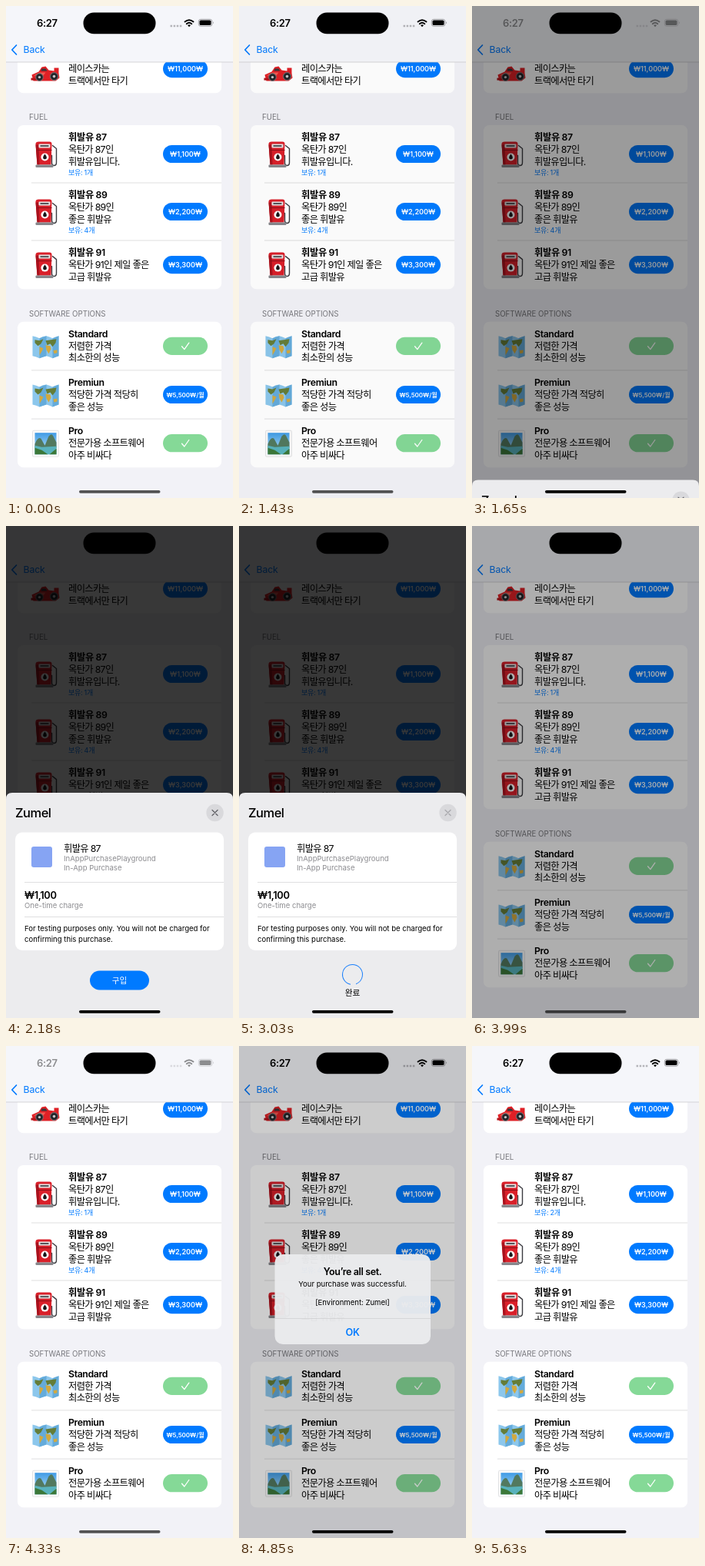
Write an HTML page that moves like this. It is 295 px wide and 640 px high and loops after 6160 ms.

```html
<!DOCTYPE html>
<html lang="ko">
<head>
<meta charset="utf-8">
<title>In-app purchase</title>
<style>
  html, body { margin: 0; width: 100%; height: 100%; overflow: hidden; background: #f2f2f7; }
  svg { display: block; }
  text { font: 400 12.3px Inter, "Noto Sans CJK KR", "Noto Sans CJK", sans-serif; fill: #000; }
  .ko { letter-spacing: -.055em; }
  .bold { font-weight: 600; letter-spacing: -.03em; }
  .owned { font-size: 9px; fill: #007aff; letter-spacing: -.03em; }
  .header { font-size: 9.7px; fill: #77777c; }
  .price { font-size: 9px; font-weight: 600; fill: #fff; text-anchor: middle; }
  .price.small { font-size: 8px; }
  .note { font-size: 9.55px; }
  .gray { fill: #8c8c90; }
  .mid { text-anchor: middle; }
  .line { stroke: #c9c9cc; stroke-width: .6; }
  .stroke { fill: none; stroke-linecap: round; stroke-linejoin: round; }
</style>
</head>
<body>
<svg width="295" height="640" viewBox="0 0 295 640">
  <defs>
    <linearGradient id="sky" x2="0" y2="1">
      <stop offset="0" stop-color="#3f9be6"/>
      <stop offset="1" stop-color="#c5e8f5"/>
    </linearGradient>

    <g id="pump">
      <path class="stroke" d="M9 -11l5 4v18q0 4-3 4t-3-4V2H6" stroke="#3b3b40" stroke-width="1.4"/>
      <path d="M-13 -13q0-3 4-3H5q3 0 3 3L7 14H-11z" fill="#d9202a"/>
      <path d="M-13 -12l2 26h3L-9 -12z" fill="#a8121d"/>
      <rect x="-9" y="-13" width="15" height="5" rx="1" fill="#e8e4e4"/>
      <path d="M-7 -10.500H4" stroke="#55555a" stroke-width="2"/>
      <path d="M-11 -5H8" stroke="#8d0f18"/>
      <circle cx="-1" cy="4" r="5" fill="#fff"/>
      <path d="M-1 0q5 6 0 7q-5-1 0-7z" fill="#17171a"/>
      <rect x="-13" y="14" width="23" height="3.500" rx="1" fill="#87878c"/>
    </g>

    <g id="map">
      <path d="M-17 -13q5 1 9 3 4-3 9-3 4 1 8 3 4-2 8-3V13q-4 1-8 3-4-2-8-3-5 1-9 3-4-2-9-3z" fill="#8cc7ec"/>
      <path d="M-8 -10l9-3V13l-9 3zM9 -10l8-3V13l-8 3z" fill="#64abdb"/>
      <path d="M-14 -8l6 1 5-2-3 6-4 3-4-4zM0 -7l7-1 7-1-1 5-4 5-3-4-4 2z" fill="#657d38"/>
      <path d="M-8 1l5 2-2 4-3 5zM0 -1l6 1 1 4-3 6-3-5zM10 6l5-1v4l-4 1z" fill="#d2a93f"/>
    </g>

    <g id="park">
      <rect x="-17" y="-16.500" width="34" height="34" rx="1.500" fill="#fafafa" stroke="#d9d9dc" stroke-width=".7"/>
      <rect x="-14" y="-13.500" width="28" height="28" fill="url(#sky)"/>
      <path d="M-14 1q4-10 8-7l5 9 5-12q4-5 6 0l4 8v7h-28z" fill="#52795f"/>
      <path d="M-14 3l9 2 19-1v10.500h-28z" fill="#58b2bc"/>
      <path d="M-14 6l9 3 8 5.500h-17zM14 7l-9 7.500h9z" fill="#3c7839"/>
    </g>

    <g id="car">
      <path d="M-18 8l9-4 4-6 5-1 4 5 7 1v-4h6v7l1 6-5 4H-16z" fill="#df2026"/>
      <path d="M-16 9l8-4h8l-3 4z" fill="#f35b53"/>
      <path d="M-5 0h5l2 3h-8z" fill="#37373c"/>
      <path d="M-19 12h8v3h-8z" fill="#b4131a"/>
      <g fill="#242428" stroke="#77777c">
        <circle cx="-8" cy="11" r="4.800"/><circle cx="11" cy="10" r="5"/>
      </g>
      <g fill="#c5c5c8"><circle cx="-8" cy="11" r="1.700"/><circle cx="11" cy="10" r="1.800"/></g>
    </g>
  </defs>

  <rect width="295" height="640" fill="#f2f2f7"/>
  <g id="list"></g>

  <rect width="295" height="73" fill="#f5f6fa"/>
  <path d="M0 73H295" stroke="#c4c4c8" stroke-width=".7"/>
  <path class="stroke" d="M13.500 51L7.800 57l5.700 6" stroke="#007aff" stroke-width="1.700"/>
  <text x="22.500" y="61.200" style="fill:#007aff;letter-spacing:-.01em">Back</text>

  <g id="status">
    <text class="bold" x="40" y="26.500" style="font-size:13px">6:27</text>
    <path d="M213.500 26h15" stroke="#b4b4b9" stroke-width="2.500" stroke-dasharray="2.500 1.600"/>
    <path class="stroke" d="M232.500 20.500q5.500-4.600 11 0M234.700 23.200q3.300-2.800 6.600 0" stroke="#000" stroke-width="1.900"/>
    <path d="M236 25q2-1.600 4 0l-2 2.200z"/>
    <rect x="250.300" y="17.300" width="17.500" height="9" rx="2.700" fill="none" stroke="#8e8e92" stroke-width=".8"/>
    <rect x="251.500" y="18.500" width="15" height="6.600" rx="1.700"/>
    <path d="M269 20.300q1.600 1.500 0 3z" fill="#8e8e92"/>
  </g>

  <rect id="dim" width="295" height="640"/>
  <rect x="100.500" y="8.500" width="94" height="27.700" rx="13.800"/>

  <g id="sheet">
    <path d="M0 8q0-8 8-8H287q8 0 8 8V400H0z" fill="#ececee"/>
    <text x="12" y="32" style="font-size:16.500px;font-weight:500;letter-spacing:-.03em">Zumel</text>
    <circle cx="271.500" cy="26" r="11.200" fill="#d9d9dc"/>
    <path id="close" class="stroke" d="M268 22.500l7 7m0-7l-7 7" stroke="#626267" stroke-width="1.300"/>
    <rect x="12" y="51.500" width="271" height="153.500" rx="9" fill="#fff"/>
    <path class="line" d="M24 116.500H283M24 161.500H283"/>
    <rect x="33" y="70" width="27" height="27" rx="3" fill="#86a4f3"/>
    <text class="ko" x="75" y="76.500">휘발유 87</text>
    <text class="note gray" x="75" y="89">InAppPurchasePlayground</text>
    <text class="note gray" x="75" y="100.500">In-App Purchase</text>
    <text class="bold" x="24" y="138" style="font-size:12.900px">₩1,100</text>
    <text class="note gray" x="24" y="150">One-time charge</text>
    <text class="note" x="24" y="180">For testing purposes only. You will not be charged for</text>
    <text class="note" x="24" y="193.500">confirming this purchase.</text>
    <g id="buy">
      <rect x="109" y="231.500" width="77" height="25" rx="12.500" fill="#007aff"/>
      <text class="mid" x="147.500" y="248" style="fill:#fff;font-size:10.500px;font-weight:500">구입</text>
    </g>
    <g class="stroke" stroke="#1a7ffb">
      <circle id="ring" cx="147.500" cy="236.500" r="13" pathLength="100" stroke-linecap="butt"/>
      <path id="check" d="M141.500 237.500l4.500 4.500 8-9.500" pathLength="100"/>
    </g>
    <text id="done" class="mid" x="147.500" y="264" style="font-size:10.700px">완료</text>
  </g>

  <g id="alert">
    <rect x="46.500" y="271" width="202.500" height="117" rx="10.500" fill="#ebecee" fill-opacity=".96"/>
    <path class="line" d="M46.500 354.500H249"/>
    <g class="mid">
      <text class="bold" x="147.500" y="297.500" style="font-size:12.500px">You’re all set.</text>
      <text class="note" x="147.500" y="312.500">Your purchase was successful.</text>
      <text class="note" x="147.500" y="336.500">[Environment: Zumel]</text>
      <text class="bold" x="147.500" y="376.500" style="font-size:12.700px;fill:#007aff">OK</text>
    </g>
  </g>
  <rect id="home" x="95" y="630" width="105.500" height="3.700" rx="1.850"/>
</svg>

<script>
const LOOP = 6160;
const FIRST_CHANGE = 1427;
const STEP = 320 / 3;
const COUNT_UPDATE = 5630;
const ROW = 63.2, OWNED_ROW = 75, LINE = 15.7;
const $ = id => document.getElementById(id);

const sections = [
  { top: 50, rows: [
    { icon: "car", lines: ["", "레이스카는", "트랙에서만 타기"], price: "₩11,000₩" }] },
  { top: 155, name: "FUEL", rows: [
    { icon: "pump", lines: ["휘발유 87", "옥탄가 87인", "휘발유입니다."], price: "₩1,100₩", owned: 1, id: "count" },
    { icon: "pump", lines: ["휘발유 89", "옥탄가 89인", "좋은 휘발유"], price: "₩2,200₩", owned: 4 },
    { icon: "pump", lines: ["휘발유 91", "옥탄가 91인 제일 좋은", "고급 휘발유"], price: "₩3,300₩" }] },
  { top: 410.7, name: "SOFTWARE OPTIONS", rows: [
    { icon: "map", lines: ["Standard", "저렴한 가격", "최소한의 성능"] },
    { icon: "map", lines: ["Premiun", "적당한 가격 적당히", "좋은 성능"], price: "₩5,500₩/월" },
    { icon: "park", lines: ["Pro", "전문가용 소프트웨어", "아주 비싸다"] }] }
];

const ownedLabel = n => `보유: ${n}개`;

function button(price, y) {
  const label = price
    ? `<text class="price ${price.includes("/") ? "small" : ""}" x="233" y="${y + 3.2}">${price}</text>`
    : `<path class="stroke" d="M228.500 ${y + .5}l3.300 3.800 6-8.500" stroke="#fff" stroke-width="1.300"/>`;
  return `<rect x="204" y="${y - 11.6}" width="58" height="23.200" rx="11.600"
    fill="${price ? "#007aff" : "#85d997"}"/>${label}`;
}

function rowMarkup({ icon, lines, price, owned, id }, top, height) {
  const mid = top + height / 2;
  const base = top + 20.2;
  const texts = lines.map((line, i) =>
    `<text class="${i ? "ko" : "bold"}" x="81" y="${base + i * LINE}">${line}</text>`).join("");
  const count = owned
    ? `<text id="${id || ""}" class="owned" x="81" y="${base + 45}">${ownedLabel(owned)}</text>` : "";
  return `<use href="#${icon}" x="51.500" y="${mid}"/>${texts}${count}${button(price, mid)}`;
}

function sectionMarkup({ top, name = "", rows }) {
  let y = top, content = "";
  for (const row of rows) {
    const height = row.owned ? OWNED_ROW : ROW;
    if (y > top) content += `<path class="line" d="M33 ${y}H280"/>`;
    content += rowMarkup(row, y, height);
    y += height;
  }
  return `<text class="header" x="30" y="${top - 6.6}">${name}</text>
    <rect x="15" y="${top}" width="265" height="${y - top}" rx="7.500" fill="#fff"/>${content}`;
}
$("list").innerHTML = sections.map(sectionMarkup).join("");

const linear = (t, start, length) => Math.min(1, Math.max(0, (t - start) / length));
const easeOut = (...span) => 1 - (1 - linear(...span)) ** 3;
function smooth(...span) {
  const x = linear(...span);
  return x * x * (3 - 2 * x);
}

const fade = (id, opacity) => $(id).setAttribute("opacity", opacity);
function draw(id, part) {
  $(id).setAttribute("stroke-dasharray", part < 1 ? `${part * 100} 200` : "none");
  fade(id, part > 0 ? 1 : 0);
}

const held = t => FIRST_CHANGE + Math.floor((t - FIRST_CHANGE) / STEP) * STEP;

function render(now) {
  const t = held(now);
  const sheetDim = smooth(t, 1380, 520) - smooth(t, 3700, 510);
  const alertDim = smooth(t, 4380, 350) - smooth(t, 5030, 380);
  fade("dim", .78 * sheetDim + .2 * alertDim);
  fade("status", 1 - smooth(t, 1400, 430) + smooth(t, 4190, 260));
  fade("home", .66 + .34 * (linear(t, 1430, 100) - linear(t, 3780, 100) + linear(t, 4430, 200)));

  const raised = easeOut(t, 1625, 560) - smooth(t, 3720, 260);
  $("sheet").setAttribute("transform", `translate(0 ${640 - 293 * raised})`);

  const buying = smooth(t, 2190, 310);
  fade("buy", 1 - buying);
  fade("close", 1 - .6 * buying);
  draw("ring", linear(t, 2380, 710));
  draw("check", linear(t, 3070, 390));
  fade("done", linear(t, 2600, 220));
  $("ring").setAttribute("transform", `rotate(${103 + (t - 3030) * .6} 147.5 236.5)`);

  const shown = smooth(t, 4350, 400);
  const scale = 1.17 - .17 * shown;
  fade("alert", shown - smooth(t, 5000, 400));
  $("alert").setAttribute("transform",
    `translate(147.5 329.5) scale(${scale}) translate(-147.5 -329.5)`);
  $("count").textContent = ownedLabel(now < COUNT_UPDATE ? 1 : 2);
}

const start = performance.now();
function frame() {
  render((performance.now() - start) % LOOP);
  requestAnimationFrame(frame);
}
frame();
</script>
</body>
</html>
```
